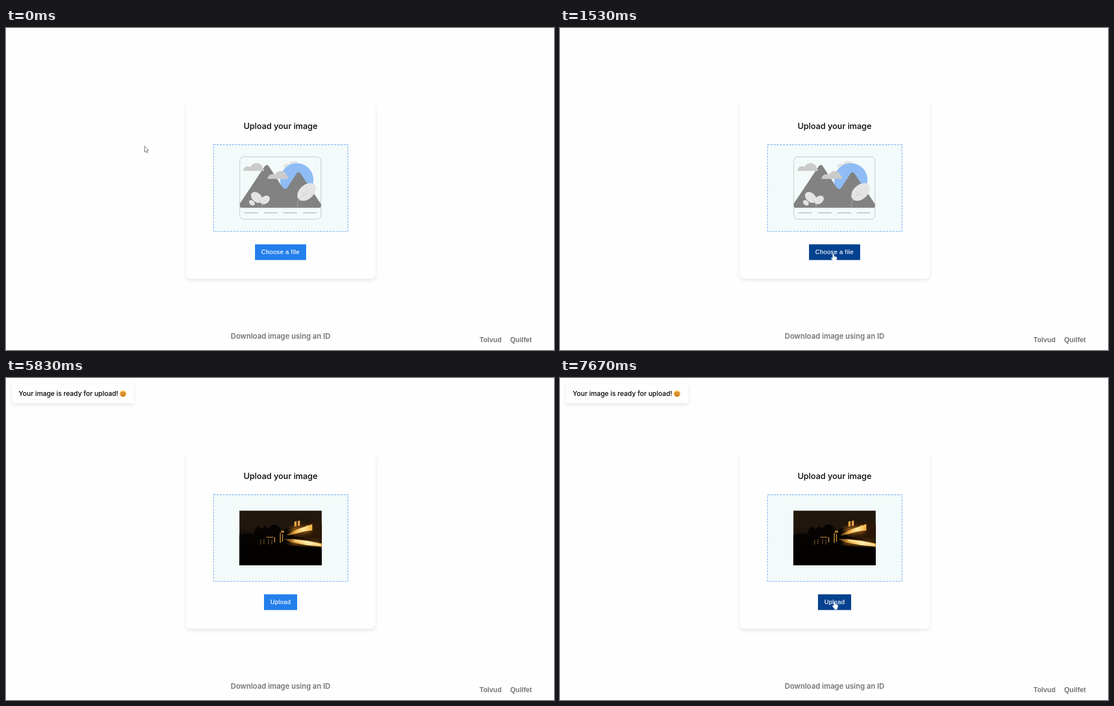
Write an HTML page that moves like this. It is 975x574 px and loops after 8 s.

```html
<!DOCTYPE html>
<html lang="en">
<head>
<meta charset="utf-8">
<title>Image upload</title>
<style>
  html, body { margin: 0; width: 100%; height: 100%; overflow: hidden; background: #fefefe; }
  svg { display: block; width: 975px; height: 574px; }
  .ui { font: 500 14.6px Inter, "Open Sans", sans-serif; }
  .btn { font: 10.8px "Liberation Sans", Arial, sans-serif; letter-spacing: .4px; fill: #fff; stroke: #fff; stroke-width: .2px; }
  .link { font: bold 12.2px "Liberation Sans", Arial, sans-serif; fill: #757575; }
  .card { fill: #fefefe; filter: drop-shadow(0 3px 3px rgba(0, 0, 0, .09)); }
</style>
</head>
<body>
<svg viewBox="0 0 975 574">
  <defs>
    <path id="cloud" d="M0 14Q1 6 9 5.5Q11 5.8 13 7Q16 0 24 0Q33 .5 34.5 8.5Q37 10 37 14Z"/>
    <linearGradient id="night" x2="0" y2="1">
      <stop offset="0" stop-color="#23180d"/>
      <stop offset=".3" stop-color="#20160d"/>
      <stop offset=".5" stop-color="#120c06"/>
      <stop offset=".7" stop-color="#060403"/>
      <stop offset="1" stop-color="#020101"/>
    </linearGradient>
    <linearGradient id="beam">
      <stop offset="0" stop-color="#c47a22" stop-opacity=".35"/>
      <stop offset=".35" stop-color="#f0b248"/>
      <stop offset=".65" stop-color="#ffe9a0"/>
      <stop offset="1" stop-color="#f0ac40"/>
    </linearGradient>
    <linearGradient id="face" x2="0" y2="1">
      <stop offset="0" stop-color="#fbc24a"/>
      <stop offset="1" stop-color="#f08c22"/>
    </linearGradient>
    <filter id="soft" x="-50%" y="-50%" width="200%" height="200%" color-interpolation-filters="sRGB"><feGaussianBlur stdDeviation=".6"/></filter>
    <filter id="glow" x="-50%" y="-50%" width="200%" height="200%" color-interpolation-filters="sRGB"><feGaussianBlur stdDeviation="3.5"/></filter>
    <clipPath id="frame"><rect x="415.3" y="236.5" width="146.4" height="97.3"/></clipPath>
  </defs>

  <rect class="card" x="320" y="133" width="337.5" height="314" rx="8"/>
  <text class="ui" x="488.5" y="180" text-anchor="middle">Upload your image</text>
  <rect x="369.2" y="208" width="239.2" height="154.6" fill="#f3fafa" stroke="#86baf2" stroke-width="1.3" stroke-dasharray="3.6 1.9"/>

  <g id="drawing">
    <rect x="415.9" y="229.8" width="144.6" height="111" rx="7" fill="none" stroke="#c2c6c7"/>
    <use href="#cloud" transform="translate(493 237) scale(.82)" fill="#e3e4e4"/>
    <circle cx="517.4" cy="270.8" r="29.7" fill="#8fbcf5"/>
    <path fill="#828282" d="M416 313L460 247Q464 241 468 247L492 284Q497 290 501 284L516.5 260Q520.5 254 524.5 260L560.5 314V317Q560.5 320.6 557 320.6H419.5Q416 320.6 416 317Z"/>
    <use href="#cloud" x="422" y="240.8" fill="#cbcbcb"/>
    <use href="#cloud" x="465.2" y="255" fill="#cbcbcb"/>
    <g fill="#e4e4e4">
      <ellipse rx="11.5" ry="8" transform="translate(446 302) rotate(42)"/>
      <ellipse rx="9.3" ry="6.6" transform="translate(461 306.5) rotate(-38)"/>
      <ellipse rx="5.8" ry="4" transform="translate(437.6 311.6) rotate(40)"/>
      <ellipse rx="19" ry="12.6" transform="translate(534.8 292.3) rotate(-42)"/>
    </g>
    <g fill="none" stroke="#c4c4c4" stroke-width=".6">
      <path d="M519 320Q516 310 526 301T537 287M527 300L537 296M529 297L529 291"/>
      <path d="M456 320Q456 311 447 303M456 316Q457 310 462 306"/>
    </g>
    <path d="M424 329.6h24m11 0h24m10.5 0h24m10.5 0h24" stroke="#b5b8b9" stroke-width="1.5"/>
  </g>

  <g id="photo" clip-path="url(#frame)">
    <rect x="415" y="236" width="147" height="98" fill="url(#night)"/>
    <path fill="#060403" d="M415 280L426 277 440 278 444 268 449 264 454 270 460 264 467 268 473 262 481 261 486 266 491 273 500 268 512 266 562 262V300H415Z"/>
    <path fill="#2a1707" d="M511 256L526 252 530 258 552 255 562 260V290L511 282Z"/>
    <g fill="#d07f22" filter="url(#glow)">
      <ellipse cx="524" cy="271" rx="20" ry="6" opacity=".7"/>
      <ellipse cx="532" cy="294" rx="30" ry="4" opacity=".7"/>
    </g>
    <g fill="#e3a045" filter="url(#soft)">
      <path d="M513 256l4-1v9l-4 1zM519 255l4-1v9l-4 1zM534 263l5-1v10l-5 1zM540 261.500l5-1v11l-5 1z"/>
      <path d="M463 283h13v1.500h-13zM477 284h2v9h-2zM487 276h2v18h-2zM491 278h2v14h-2zM489 272h6v4h-6z" opacity=".7"/>
      <path d="M452 288h2v9h-2zM458 287h2v9h-2zM466 287h2v9h-2zM472 288h2v9h-2z" opacity=".3"/>
    </g>
    <g fill="url(#beam)" filter="url(#soft)">
      <path d="M499 279L520 269 535 264 545 262V271L528 274 510 279 501 281Z"/>
      <path d="M494 287L512 287 535 290 562 295V301L535 298 508 293Z"/>
    </g>
    <path d="M512 289.500L535 293 560 297.500" fill="none" stroke="#fff3c4" stroke-width="1.600" filter="url(#soft)"/>
    <path fill="#030201" d="M415 300Q460 295 495 298T562 304V334H415Z"/>
  </g>

  <rect id="button" y="385.6" height="28"/>
  <text id="label" class="btn" y="403"></text>

  <g id="toast">
    <rect class="card" x="11" y="11" width="217" height="34" rx="2"/>
    <text class="ui" x="22.6" y="32" style="font-size:11.9px">Your image is ready for upload!</text>
    <circle cx="208.2" cy="28" r="5.8" fill="url(#face)"/>
    <g fill="#59351a"><ellipse cx="206.2" cy="26.8" rx=".8" ry="1.2"/><ellipse cx="210.2" cy="26.8" rx=".8" ry="1.2"/></g>
    <path d="M205.2 30Q208.2 32.8 211.2 30" fill="none" stroke="#59351a" stroke-width=".9"/>
  </g>

  <text class="ui" x="488.5" y="553.6" text-anchor="middle" style="font-size:13px;font-weight:600" fill="#757575">Download image using an ID</text>
  <text class="link" x="842.6" y="560.4">Tolvud</text>
  <text class="link" x="897" y="560.4">Quilfet</text>

  <path id="arrow" d="M.5 .6V11.2L2.9 9 4.5 12.6 6.2 11.8 4.6 8.3H7.8Z" fill="#fff" stroke="#4a4e5c" stroke-width=".8"/>
  <path id="hand" d="M3.2 1.3Q4.3 0 5.3 1.3V5.2L9.4 6.1Q10.7 6.5 10.6 8L10 11.2 9.2 12.6V14.5H4.2V13L.7 8.9Q.3 7.6 1.6 7.5L3.2 8.8Z" fill="#fff" stroke="#dfe6f2" stroke-width=".4"/>
</svg>
<script>
const LOOP = 8000, READY = 5380, PHOTO = 5830;
const BLUE = [36, 127, 236], NAVY = [4, 66, 143];
const $ = id => document.getElementById(id);

// Spreads a move between two points over times, one share of the way per time.
const move = (from, to, times, shares) => times.map((t, i) => ({
  t, kind: 'arrow',
  x: from[0] + (to[0] - from[0]) * shares[i],
  y: from[1] + (to[1] - from[1]) * shares[i]
}));
const hover = (t, x, y, dark) => ({ t, kind: 'hand', x, y, dark });

const steps = [
  { t: 0, kind: 'arrow', x: 246, y: 210 },
  ...move([246, 210], [396, 331], [190, 260, 330, 400], [.3, .64, .9, 1]),
  ...move([396, 331], [473, 386], [830, 910, 1000, 1080, 1160, 1230, 1310], [.05, .18, .38, .6, .82, .94, 1]),
  hover(1370, 476, 392, .4), hover(1450, 480, 399, .8), hover(1530, 482, 402, 1),
  { t: 3930, kind: 'none', dark: 1 },
  { t: READY, kind: 'none' },
  ...move([365, 277], [447, 409], [6670, 6750, 6830, 6900, 6980, 7060, 7140, 7210], [0, .1, .28, .5, .7, .86, .95, 1]),
  ...move([447, 409], [476, 410], [7310, 7380, 7460], [.25, .65, 1]),
  hover(7530, 479, 405, .4), hover(7600, 482, 401, .8), hover(7670, 484, 398, 1)
];

const show = (id, on) => { $(id).style.display = on ? '' : 'none'; };

function render(t) {
  const step = steps.findLast(s => s.t <= t);
  const ready = t >= READY;
  show('drawing', !ready);
  show('toast', ready);
  show('photo', t >= PHOTO);

  const width = ready ? 59 : 91, left = 488.5 - width / 2;
  const mix = BLUE.map((c, i) => Math.round(c + (NAVY[i] - c) * (step.dark || 0)));
  $('button').setAttribute('x', left);
  $('button').setAttribute('width', width);
  $('button').setAttribute('fill', `rgb(${mix})`);
  $('label').setAttribute('x', left + 11.2);
  $('label').textContent = ready ? 'Upload' : 'Choose a file';

  for (const id of ['arrow', 'hand']) {
    show(id, step.kind === id);
    if (step.kind === id) $(id).setAttribute('transform', `translate(${step.x} ${step.y})`);
  }
}

const start = performance.now();
function tick() {
  render((performance.now() - start) % LOOP);
  requestAnimationFrame(tick);
}
tick();
</script>
</body>
</html>
```
